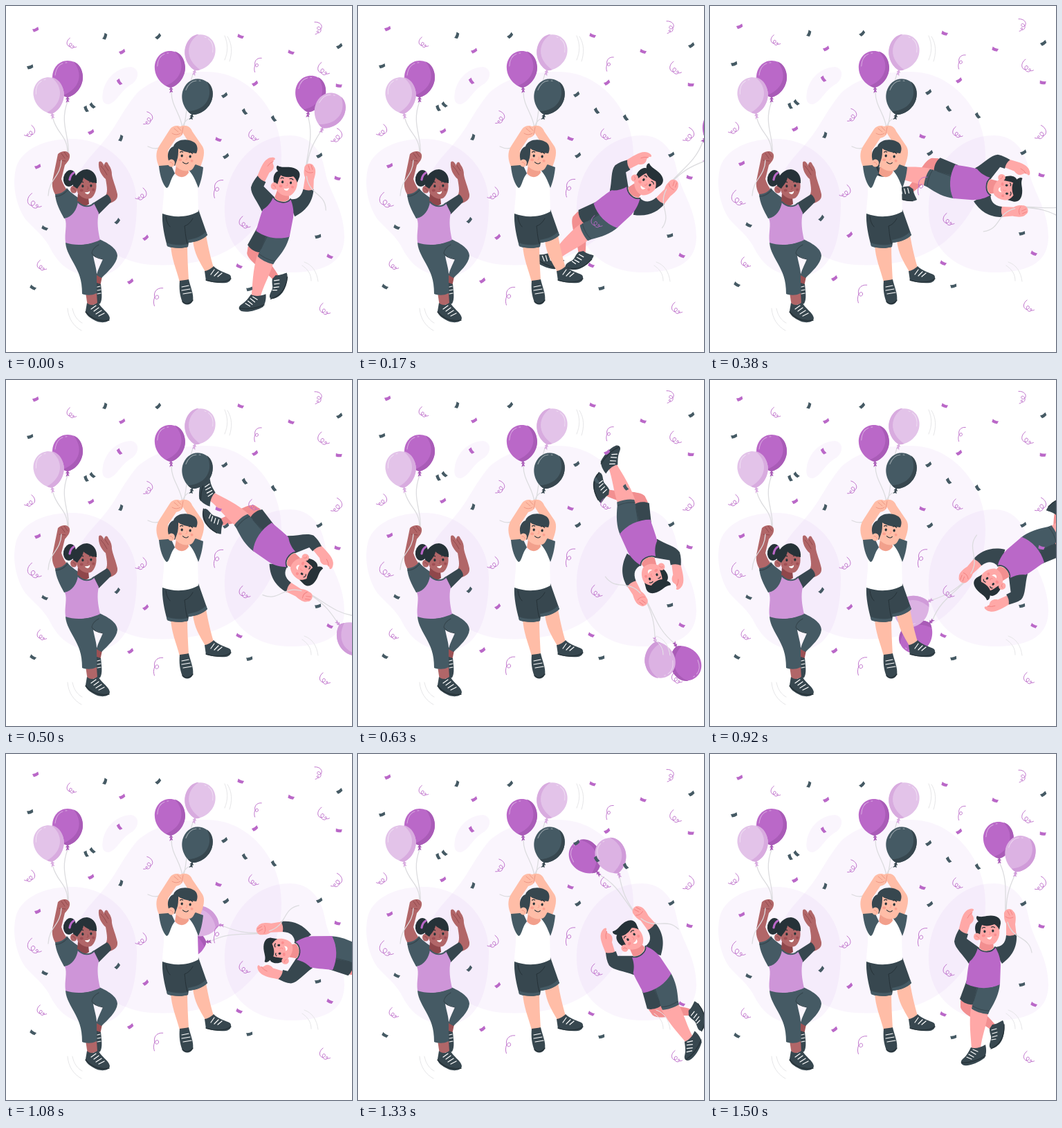
These frames come from a looping animation (500x500 px, 1540 ms). An HTML page:

```html
<!DOCTYPE html>
<html lang="en">
<head>
<meta charset="utf-8">
<title>Balloon party</title>
<style>
html, body { margin: 0; width: 100%; height: 100%; overflow: hidden; background: #fff; }
svg { display: block; width: 100vw; height: 100vh; }
</style>
</head>
<body>
<svg id="stage" viewBox="0 0 500 500"></svg>
<script>
const PURPLE = '#ba68c8', SLATE = '#455a64', DARK = '#37474f', INK = '#263238';
const BROWN = '#b16668', PEACH = '#ffbda7', PINK = '#ffa8a7';

const fill = (c, d, extra = '') => `<path fill="${c}" d="${d}" ${extra}/>`;
const line = (c, w, d, extra = '') =>
  `<path fill="none" stroke="${c}" stroke-width="${w}" stroke-linecap="round" stroke-linejoin="round" d="${d}" ${extra}/>`;
const oval = (c, x, y, rx, ry = rx, turn = 0) =>
  `<ellipse fill="${c}" cx="${x}" cy="${y}" rx="${rx}" ry="${ry}" transform="rotate(${turn} ${x} ${y})"/>`;
const at = (x, y, turn, body, sx = 1, sy = sx) =>
  `<g transform="translate(${x} ${y}) rotate(${turn}) scale(${sx} ${sy})">${body}</g>`;
const string = d => line('#dcdcdf', 1.3, d);
const laces = d => line('#fff', 1.2, d);

function balloon(x, y, turn, main, shade, flip = 1) {
  return at(x, y, turn,
    fill(main, 'M0 -26C13 -26 22 -15 22 -2C22 13 10 25 0 27C-10 25 -22 13 -22 -2C-22 -15 -13 -26 0 -26Z') +
    fill(shade, 'M8 -25C23 -9 19 15 -7 24Q-3 27 0 27C10 25 22 13 22 -2C22 -13 17 -22 8 -25Z') +
    line('#fff', 1, 'M-18 -5C-17 -14 -13 -20 -7 -22M-3 -23L-1 -23.2', 'opacity=".45"') +
    fill(shade, 'M0 26L-3 30L3 30ZM-1 30L-2.5 35L0 33L2.5 34L1 30Z'), flip, 1);
}
const violet = (x, y, turn) => balloon(x, y, turn, PURPLE, '#a95bb7');
const lilac = (x, y, turn, flip) => balloon(x, y, turn, '#e3c3e9', '#d8abdf', flip);

function face(x, y, turn, mark, smile) {
  return at(x, y, turn,
    oval(INK, -6, -2, 1.6, 2) + oval(INK, 6, -2, 1.6, 2) +
    line(INK, 1.2, 'M-9 -7Q-7 -9 -5 -7.5M4 -7.5Q7 -9 9 -6.5') +
    line(mark, 1, 'M1 -1Q3 3 0 3') +
    oval(mark, -8, 4, 2.6, 2) + oval(mark, 9, 4, 2, 2) + smile);
}
const grin = fill('#fff', 'M-3.5 7Q1 8 4 5.5Q3.5 9.8 .5 10Q-2.5 10 -3.5 7Z');

function backdrop() {
  const tint = d => fill('#9c4fd6', d, 'opacity=".055"');
  return tint('M290 95C350 95 398 150 398 215C398 270 375 310 340 340C300 372 250 376 210 374C150 370 100 320 98 275C97 245 115 225 135 203C160 175 165 155 190 125C215 103 250 95 290 95Z') +
    tint('M95 192C150 192 189 235 189 285C189 340 175 390 130 390C98 390 80 378 66 354C56 332 40 322 28 308C14 288 8 256 15 232C24 207 55 192 95 192Z') +
    tint('M410 187C438 187 456 207 461 238C466 268 488 290 489 333C489 368 465 384 415 385C350 386 316 345 316 295C316 232 360 187 410 187Z') +
    tint('M140 125C142 110 155 90 180 88C192 89 194 103 183 112C165 122 160 140 148 142C140 142 138 135 140 125Z') +
    line('#e6e6e8', 1, 'M316 43C321 55 321 66 316 78M320 44C327 55 327 68 323 80M89 437C90 452 98 463 109 469M96 437C98 448 104 455 110 458');
}

function girl() {
  return string('M68 163C74 185 89 188 89 212M89 138C77 170 92 188 90 212') +
    violet(89, 105, 0) + lilac(62, 129, -10) +
    // back foot and legs
    fill('#9b5154', 'M130 386L139 391L136 405L130 404Z') +
    fill(DARK, 'M131 400L137 402C138 412 140 424 136 430C132 432 128 428 129 420Z') +
    laces('M132 406L136 405M132 411L137 410M132 416L137 415') +
    fill(BROWN, 'M115 414L131 414L132 430L118 434Z') +
    fill(DARK, 'M117 429C122 434 129 432 133 428C137 437 149 443 150 451C149 458 138 458 132 456C123 452 115 447 115 441Z') +
    line(INK, 1.4, 'M115 442C122 450 133 457 149 454') +
    laces('M123 438L130 433M127 441L134 436M130 445L138 440M134 448L142 444') +
    fill(SLATE, 'M86 340C104 347 122 345 135 337C146 342 161 350 161 361C160 373 147 384 138 393L131 389L131 415C123 419 115 418 110 416C110 395 105 385 98 372C90 358 86 350 86 340ZM126 361C128 372 131 380 131 388C133 380 137 373 140 366Z', 'fill-rule="evenodd"') +
    line(DARK, 1.2, 'M134 345Q125 350 124 357Q126 363 140 366') +
    // arms
    fill(BROWN, 'M134 226C137 222 140 227 142 231C142 225 146 223 148 229C152 234 153 239 153 244C154 251 159 262 161 272C162 280 156 283 150 285L142 276C148 271 146 262 144 250C138 245 133 236 134 226Z') +
    line('#8f474b', .9, 'M137 231Q142 236 146 244M142 229L148 238') +
    fill(BROWN, 'M75 214C80 209 90 208 92 215C93 222 88 226 85 230L80 250Q83 260 90 268L73 275C66 266 66 256 68 248Z') +
    line('#8f474b', .9, 'M80 213L85 220M84 211L89 218M77 223L86 224') +
    fill(DARK, 'M124 286L146 272C150 275 152 279 152 283L134 301Z') +
    fill(SLATE, 'M71 272C78 272 85 268 88 263C95 272 104 276 109 281C104 297 96 307 84 307C78 296 72 285 71 272Z') +
    line(DARK, 1.4, 'M72 275Q81 275 89 266') +
    // shirt
    fill('#ce95d8', 'M104 283C112 291 122 291 127 285L134 299C131 312 133 325 136 338C120 346 100 347 86 342C84 328 89 316 85 307C95 305 103 294 104 283Z') +
    // head
    oval(INK, 92, 249, 9, 12, 12) + line(PURPLE, 3.2, 'M92 251Q93 244 98 241') +
    fill('#8f474b', 'M104 270L119 276L120 286C114 291 107 288 103 283Z') +
    line(SLATE, 2, 'M104 283C111 291 121 291 127 285') +
    fill(BROWN, 'M102 250C110 246 124 245 129 250C132 259 131 270 124 277C116 282 106 275 103 269Z') +
    oval(BROWN, 98, 265, 5, 5.5) + line('#8f474b', .9, 'M96 264Q99 263 100 267') +
    fill(INK, 'M97 260C96 247 106 236 117 236C127 237 132 246 131 256C123 255 116 252 112 248C111 254 107 258 103 264Z') +
    face(117, 262, -3, '#a04f55', grin) +
    string('M80 223C79 247 62 250 61 274');
}

function middleBoy() {
  return string('M239 124C239 145 252 155 255 176M270 99C262 120 263 150 257 174M266 162Q256 166 255 178') +
    string('M205 203C215 208 225 206 231 199') +
    violet(237, 91, -3) + lilac(280, 67, 15, -1) + balloon(276, 131, 15, SLATE, DARK) +
    // legs
    fill(PEACH, 'M238 345L262 345C262 362 263 380 264 397L251 399C246 380 239 365 238 345ZM270 339L289 331C292 348 296 365 300 378L288 384C280 370 272 358 270 339Z') +
    fill(DARK, 'M251 397C256 396 262 396 264 395C266 405 272 417 270 426C267 433 258 433 255 428C251 418 250 408 251 397Z') +
    fill(DARK, 'M287 383C290 383 296 380 300 376C308 384 318 385 324 389C327 394 324 399 318 400C308 401 297 399 289 397Z') +
    line(INK, 1.3, 'M255 427Q262 434 270 425M289 396C300 400 315 401 325 394') +
    laces('M254 406L264 404M254 411L266 409M256 416L268 414M296 388L301 381M301 390L307 384M306 391L312 386') +
    fill(DARK, 'M226 298C242 306 262 305 278 294L291 331C284 338 274 341 264 342L263 348C254 351 240 350 233 347C229 332 225 315 226 298Z') +
    fill(SLATE, 'M232 342C242 346 254 346 262 344L263 348C254 351 240 350 233 347ZM263 338C274 336 283 333 289 326L291 331C284 338 274 341 264 342Z') +
    line(INK, 1, 'M262 343C259 333 259 323 258 318Q265 316 270 307M231 304Q232 314 237 319') +
    // arms and sleeves
    fill(PEACH, 'M250 175C258 170 267 174 269 181L284 203C288 210 286 220 280 235L268 231C271 222 273 214 272 209L259 189Z') +
    fill(PEACH, 'M237 178C242 171 254 171 256 180C256 188 250 190 246 191L234 209L239 234L222 234C216 222 216 211 221 203Z') +
    line('#eb9481', .9, 'M243 177L249 182M248 175L253 180M240 184Q246 188 252 184M256 175L254 186') +
    fill('#fff', 'M236 239C242 249 258 250 266 237C274 243 277 252 277 262L278 297C262 306 242 306 226 300C226 285 230 270 227 255Z') +
    fill(SLATE, 'M221 231C228 231 234 229 239 231L244 242C237 250 237 262 232 263C227 259 222 245 221 231Z') +
    fill(SLATE, 'M274 229L285 233C284 245 281 256 278 263C274 252 270 243 263 236Z') +
    // head
    fill('#f2a08c', 'M246 230L263 234L264 241C258 250 249 248 244 242Z') +
    fill(PEACH, 'M246 205C258 200 271 203 274 210C276 222 274 232 268 237C258 241 248 236 244 229Z') +
    fill(DARK, 'M236 226C231 214 236 205 242 203C245 193 261 191 270 196C277 199 278 207 275 213C266 212 256 211 249 206C249 212 249 218 247 223L244 231Z') +
    oval(PEACH, 239, 227, 5, 5.5) + line('#eb9481', .9, 'M237 226Q240 225 241 229') +
    face(260, 219, 5, '#fba190', line(INK, 1, 'M-4 7Q1 11 4 7'));
}

// upright pose; the turn is applied to the whole group
function spinningBoy() {
  return string('M418 156C431 183 426 203 427 230M440 176C431 196 428 208 428 230') +
    violet(417, 124, -2) + balloon(448, 144, 13, '#dcb2e3', '#d09bd9') +
    // back leg
    fill('#f28f90', 'M362 356L383 360C390 370 400 376 412 391L405 398C390 386 365 377 362 366Z') +
    fill(DARK, 'M408 391C413 391 419 387 423 385C427 390 426 410 419 418C413 425 405 428 404 423C403 418 407 413 406 408C405 404 404 402 404 397Z') +
    line(INK, 1.3, 'M425 391C426 411 417 421 406 426') +
    laces('M407 399L414 397M408 404L415 402M408 409L415 407M407 413L413 412') +
    fill(DARK, 'M371 327L361 354C367 361 376 363 383 362L394 336Z') +
    // front leg
    fill(PINK, 'M377 367L402 372C400 392 392 410 391 426L378 427C377 408 374 390 377 367Z') +
    fill(DARK, 'M377 424C382 426 390 425 398 420C400 428 399 434 397 439C388 446 376 451 367 450C361 448 362 443 366 440C371 436 374 430 377 424Z') +
    line(INK, 1.3, 'M364 446C375 447 389 442 398 436') +
    laces('M377 430L384 434M374 434L381 438M371 438L378 441M380 427L387 430') +
    fill(SLATE, 'M386 335C400 339 412 337 419 331C418 346 412 358 404 371L402 376C392 375 383 372 378 368C381 356 384 346 386 335Z') +
    line(DARK, 1, 'M379 364Q391 371 403 371M387 337L381 357') +
    // arms
    fill(PINK, 'M359 256C362 244 364 232 370 227C374 223 382 222 381 226C378 228 378 231 380 234C383 239 379 244 376 246L371 261Z') +
    line('#f28080', .9, 'M379 229Q374 232 372 237') +
    fill(PINK, 'M425 232C424 225 434 221 438 227C443 231 442 240 441 246L443 263L428 264L428 245C425 240 425 236 425 232Z') +
    line('#f28080', .9, 'M430 227L433 233M434 226L437 232M427 235Q432 239 438 236') +
    fill(DARK, 'M360 253Q365 259 373 260L371 267L389 280C386 290 380 299 374 303C366 290 354 281 353 271C354 264 357 258 360 253Z') +
    fill(DARK, 'M428 262Q436 264 443 260C444 275 440 290 422 303C417 295 412 286 411 279C421 279 427 274 428 262Z') +
    // shirt
    fill(PURPLE, 'M387 280C394 288 408 287 412 279C417 287 420 296 420 305L419 333C404 340 386 340 370 332C372 318 373 306 375 300C381 295 385 288 387 280Z') +
    fill('#f28f90', 'M391 270L409 272L410 280C404 286 394 286 389 280Z') +
    line(DARK, 1.8, 'M387 280C394 288 408 287 412 279') +
    // head
    fill(PINK, 'M388 248C398 243 412 243 417 249C420 258 418 268 411 274C402 278 392 273 388 266Z') +
    fill(INK, 'M386 262C381 253 383 244 388 242C385 239 384 236 386 234C391 236 394 235 400 234C412 232 421 236 420 245L418 254C416 250 414 248 411 246C404 249 397 249 393 247C391 251 391 256 390 261Z') +
    oval(PINK, 386, 264, 5, 5.3) + line('#f28080', .9, 'M384 263Q387 262 388 266') +
    face(403, 258, -4, '#fb8e90', grin) +
    string('M430 243C438 270 461 262 465 287');
}

function party() {
  const chip = c => ([x, y, turn]) =>
    at(x, y, turn, fill(c, 'M-4.6 -2.2Q-1 -.8 4.4 -2.6L4 1.8Q0 3.2 -4 2.6Z'));
  const violetChips = [[43, 34, -20], [168, 66, -25], [339, 44, 25], [412, 67, 25], [164, 110, 60],
    [123, 182, -25], [46, 232, -20], [360, 112, -30], [307, 193, 25], [481, 115, 10], [479, 249, 20],
    [202, 335, -35], [180, 398, -30], [337, 376, 30], [468, 362, 30]];
  const darkChips = [[143, 44, -65], [220, 44, -40], [35, 88, -15], [482, 58, -30], [316, 129, -30],
    [116, 149, 70], [125, 144, 50], [345, 153, 60], [387, 163, 60], [166, 191, -65], [318, 217, -30],
    [453, 216, -25], [56, 321, 30], [161, 311, -45], [451, 333, -10], [39, 407, 35], [352, 409, -10]];
  const thin = d => line(PURPLE, .9, d, 'vector-effect="non-scaling-stroke"');
  const curl = thin('M-2 -9C-9 -4 -8 4 -3 5C1 6 3 1 0 0C-4 -1 -4 7 1 8C5 9 6 4 4 4C1 4 3 9 9 6');
  const wave = thin('M6 -11C-3 -12 -7 -4 -4 2C-2 5 2 2 0 -1C-3 -4 -8 4 -5 12');
  const curls = [[94, 54, 0, .85], [458, 91, 0, 1.05], [357, 187, 0, .9], [40, 282, 0, 1.25],
    [344, 313, 0, 1], [51, 375, 0, .85], [460, 438, 0, .95],
    [450, 31, -40, -.95], [35, 181, 0, -.95], [205, 162, -20, -1], [478, 187, -10, -1.1], [196, 272, 0, -1]];
  const waves = [[364, 85, .88], [307, 264, 1.12], [220, 420, 1.12]];
  return violetChips.map(chip(PURPLE)).join('') + darkChips.map(chip(SLATE)).join('') +
    curls.map(([x, y, turn, s]) => at(x, y, turn, curl, s, Math.abs(s))).join('') +
    waves.map(([x, y, s]) => at(x, y, 0, wave, s)).join('');
}

const stage = document.getElementById('stage');
stage.innerHTML = backdrop() +
  `<g id="spin">${spinningBoy()}</g>` +
  line('#e6e6e8', 1, 'M428 375C437 381 441 388 441 397M431 370C443 374 449 384 451 398') +
  girl() + middleBoy() + `<g id="float">${party()}</g>`;
const spin = document.getElementById('spin'), float = document.getElementById('float');

const LOOP = 1540, STEPS = 37;
// steps last 40 ms, every sixth one 50 ms
function stepAt(ms) {
  let i = 0, end = 0;
  while (i < STEPS) {
    end += i % 6 === 2 ? 50 : 40;
    if (ms < end) break;
    i++;
  }
  return Math.min(i, STEPS - 1);
}

function draw(ms) {
  const p = (stepAt(ms % LOOP) + 1) / STEPS, phase = 2 * Math.PI * p;
  // a full turn, slightly slower at its ends
  spin.setAttribute('transform', `rotate(${360 * p - 5 * Math.sin(phase)} 411.5 273)`);
  float.setAttribute('transform', `translate(0 ${-4 * (1 - Math.cos(phase))})`);
}

let start;
function tick(now) {
  start ??= now;
  draw(Math.max(0, now - start));
  requestAnimationFrame(tick);
}
draw(0);
requestAnimationFrame(tick);
</script>
</body>
</html>
```
